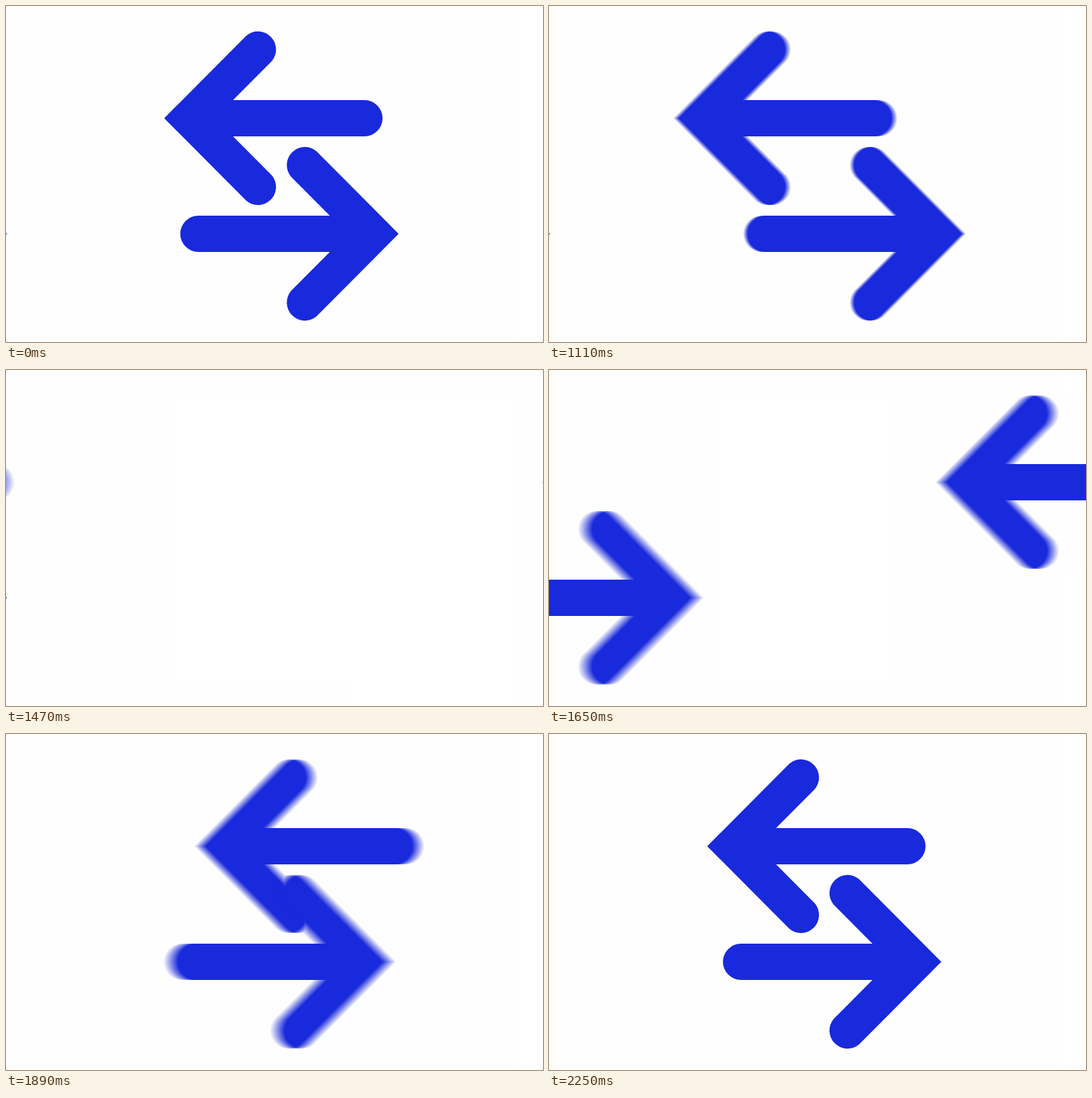
These frames come from a looping animation (800x500 px, 9 s). An HTML page without scripts:

```html
<!DOCTYPE html>
<html lang="en">
<head>
<meta charset="utf-8">
<title>Swapping arrows</title>
<style>
  /* Clock in ticks of 30 ms */
  @property --t { syntax: "<number>"; inherits: true; initial-value: 0; }
  @keyframes clock { from { --t: 0; } to { --t: 300; } }

  html, body { margin: 0; width: 100%; height: 100%; overflow: hidden; background: #fefefe; }
  svg { display: block; width: 800px; height: 500px; fill: #1929dc; animation: clock 9s steps(300) infinite; }
  rect { fill: #fefefe; }

  /* Motion blur: twelve exposures over half a tick, averaged by opacity 1/i */
  .shot {
    opacity: calc(1 / var(--i));
    --k: calc(var(--t) + (var(--i) - 6.5) / 24);
    --u: clamp(0, var(--k) - 30, 20);
    --cube: calc(var(--u) * var(--u) * var(--u));
    --q: clamp(0, (75 - var(--k)) / 10, 1);
    --settle: calc(var(--q) * var(--q) * var(--q) * var(--q));
  }
  .left.out { transform: translateX(calc(-1px * var(--cube) * (.1656 - .0044 * var(--u)))); }
  .right.out { transform: translateX(calc(1px * var(--cube) * .096)); }
  .left.in { transform: translateX(calc(1px * var(--settle) * (570 - 36.9 * clamp(0, var(--k) - 49, 16)))); }
  .right.in { transform: translateX(calc(1px * var(--settle) * (43.8 * clamp(0, var(--k) - 50, 15) - 583) - .5px)); }
</style>
</head>
<body>
<svg viewBox="0 0 800 500">
  <defs>
    <path id="l" d="M235.7 167 358 44.2A26.9 26.9 0 0 1 396 82L338.2 140H534A27 27 0 0 1 534 194H338.2L396 252A26.9 26.9 0 0 1 358 289.8Z"/>
    <use id="r" href="#l" transform="rotate(180 410.3 253)"/>
  </defs>
  <g class="shot" style="--i:1"><rect width="800" height="500"/><use class="left out" href="#l"/><use class="right out" href="#r"/><use class="left in" href="#l"/><use class="right in" href="#r"/></g>
  <g class="shot" style="--i:2"><rect width="800" height="500"/><use class="left out" href="#l"/><use class="right out" href="#r"/><use class="left in" href="#l"/><use class="right in" href="#r"/></g>
  <g class="shot" style="--i:3"><rect width="800" height="500"/><use class="left out" href="#l"/><use class="right out" href="#r"/><use class="left in" href="#l"/><use class="right in" href="#r"/></g>
  <g class="shot" style="--i:4"><rect width="800" height="500"/><use class="left out" href="#l"/><use class="right out" href="#r"/><use class="left in" href="#l"/><use class="right in" href="#r"/></g>
  <g class="shot" style="--i:5"><rect width="800" height="500"/><use class="left out" href="#l"/><use class="right out" href="#r"/><use class="left in" href="#l"/><use class="right in" href="#r"/></g>
  <g class="shot" style="--i:6"><rect width="800" height="500"/><use class="left out" href="#l"/><use class="right out" href="#r"/><use class="left in" href="#l"/><use class="right in" href="#r"/></g>
  <g class="shot" style="--i:7"><rect width="800" height="500"/><use class="left out" href="#l"/><use class="right out" href="#r"/><use class="left in" href="#l"/><use class="right in" href="#r"/></g>
  <g class="shot" style="--i:8"><rect width="800" height="500"/><use class="left out" href="#l"/><use class="right out" href="#r"/><use class="left in" href="#l"/><use class="right in" href="#r"/></g>
  <g class="shot" style="--i:9"><rect width="800" height="500"/><use class="left out" href="#l"/><use class="right out" href="#r"/><use class="left in" href="#l"/><use class="right in" href="#r"/></g>
  <g class="shot" style="--i:10"><rect width="800" height="500"/><use class="left out" href="#l"/><use class="right out" href="#r"/><use class="left in" href="#l"/><use class="right in" href="#r"/></g>
  <g class="shot" style="--i:11"><rect width="800" height="500"/><use class="left out" href="#l"/><use class="right out" href="#r"/><use class="left in" href="#l"/><use class="right in" href="#r"/></g>
  <g class="shot" style="--i:12"><rect width="800" height="500"/><use class="left out" href="#l"/><use class="right out" href="#r"/><use class="left in" href="#l"/><use class="right in" href="#r"/></g>
</svg>
</body>
</html>
```
